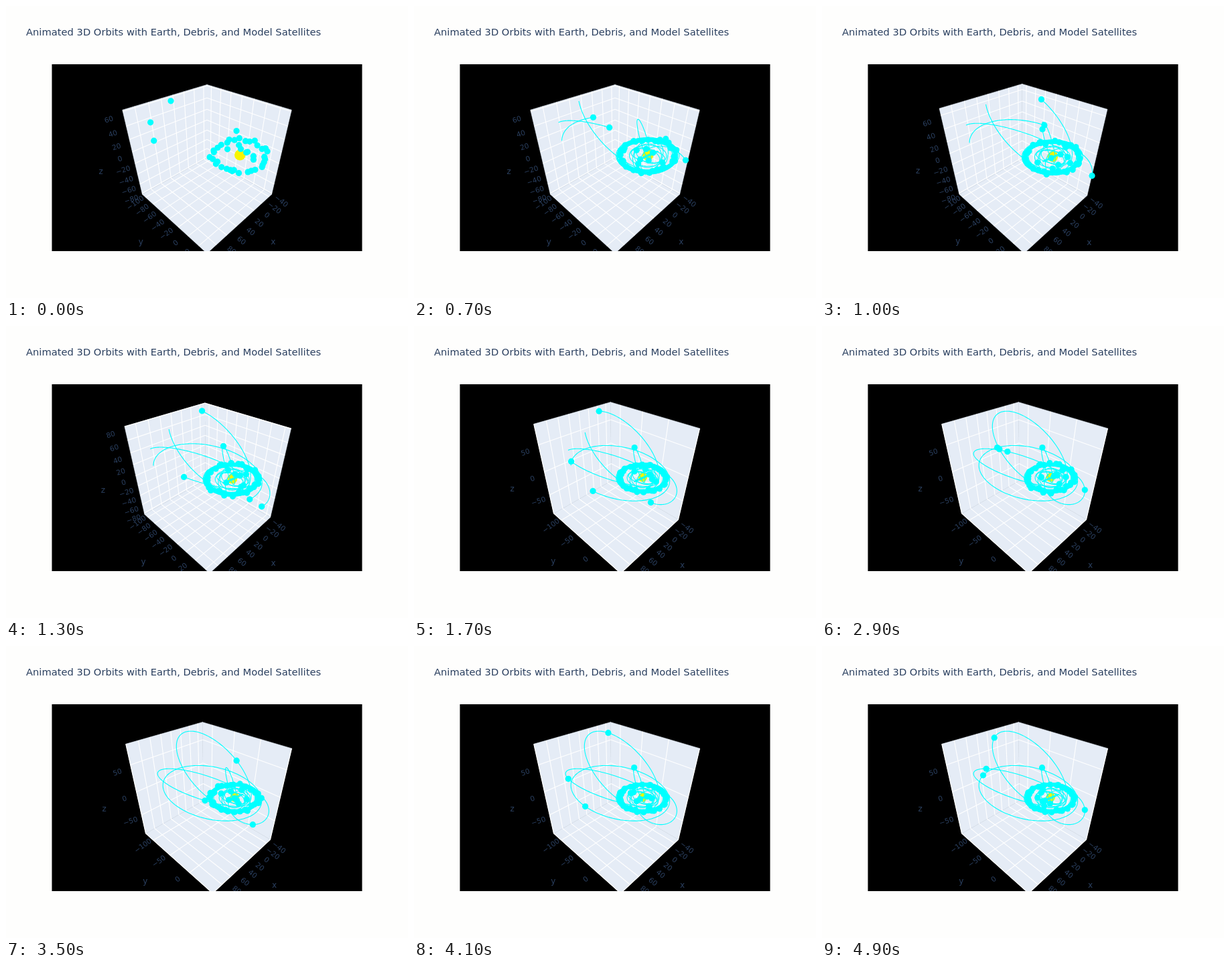
Recreate the animation shown at these times as an HTML page with a canvas. Size 600 by 436 pixels, loop 5 s.

```html
<!DOCTYPE html>
<html lang="en">
<head>
<meta charset="utf-8">
<title>Animated 3D Orbits</title>
<style>
  html, body { margin: 0; width: 100%; height: 100%; overflow: hidden; background: #fefefd; }
  canvas { position: absolute; left: 0; top: 0; width: 600px; height: 436px; }
  h1 {
    position: absolute; left: 30px; top: 28.5px; margin: 0;
    font: 14.7px/20px "DejaVu Sans", Verdana, sans-serif;
    color: #2a3f5f; white-space: nowrap;
  }
</style>
</head>
<body>
<canvas id="stage" width="600" height="436"></canvas>
<h1>Animated 3D Orbits with Earth, Debris, and Model Satellites</h1>
<script>
const ctx = document.getElementById('stage').getContext('2d');
const LOOP = 5000, STEP = 100, TAU = Math.PI * 2, DAY = 800;
const CYAN = '#00ffff', WALL = '#e5ecf6', TEXT = '#2a3f5f';
const FONT = '"DejaVu Sans", Verdana, sans-serif';

// Axis ranges widen as the far orbits climb
const views = [
  { time: 800, zoom: 1.2, lo: [-47.5, -109.5, -82], hi: [96.5, 34.5, 62] },
  { time: 1300, zoom: 1.1, lo: [-52, -110, -83.5], hi: [96, 48, 80.5] },
  { time: 1700, zoom: 1, lo: [-52, -125, -96.4], hi: [100, 50, 83.6] }
];

const lerp = (a, b, f) => a + (b - a) * f;
const mix = (a, b, f) => a.map((v, i) => lerp(v, b[i], f));

function viewAt(t) {
  const i = t < views[1].time ? 0 : 1;
  const a = views[i], b = views[i + 1];
  const f = Math.min(1, Math.max(0, (t - a.time) / (b.time - a.time)));
  const lo = mix(a.lo, b.lo, f), hi = mix(a.hi, b.hi, f);
  const volume = lo.reduce((v, l, n) => v * (hi[n] - l), 1);
  return {
    lo, hi,
    zoom: lerp(a.zoom, b.zoom, f),
    mean: Math.cbrt(volume),
    mid: mix(lo, hi, 0.5),
    steps: i + f > 1.5 ? [20, 50, 50] : [20, 20, 20]
  };
}

// Camera at (1.25, 1.25, 1.25) looking at the centre
function project(view, p) {
  const [x, y, z] = p.map((c, i) => (c - view.mid[i]) / view.mean);
  const depth = 2.165 - (x + y + z) / Math.sqrt(3);
  return [
    300 + 335 * (y - x) / Math.SQRT2 / depth,
    226.6 - 328 * (2 * z - x - y) / Math.sqrt(6) / depth,
    depth
  ];
}

function kepler(m, e) {
  let E = m + e * Math.sin(m);
  for (let i = 0; i < 8; i++) E -= (E - e * Math.sin(E) - m) / (1 - e * Math.cos(E));
  return E;
}

// Long orbit seen on screen: a points to perigee, b along the minor axis,
// g is how much the far end shrinks
function longOrbit(period, perigee, e, a, b, g) {
  return {
    period,
    at(t) {
      const m = (t - perigee) / period * TAU;
      const E = kepler(Math.atan2(Math.sin(m), Math.cos(m)), e);
      const c = Math.cos(E) - e, s = Math.sin(E), d = 1 - g * c;
      return [(a[0] * c + b[0] * s) / d, (a[1] * c + b[1] * s) / d];
    }
  };
}

// Near-circular orbit; size 1 goes round once a day
function nearOrbit(size, drift, start, tilt) {
  const period = DAY * Math.pow(size, 1.5);
  return {
    period,
    at(t) {
      const turn = TAU * t / period, angle = start - turn;
      const r = size + drift * Math.cos(turn);
      return [35 * r * Math.cos(angle), 20 * r * Math.sin(angle) + tilt * Math.sin(turn)];
    }
  };
}

let seed = 7;
function rand(lo, hi) {
  seed = (seed * 16807) % 2147483647;
  return lerp(lo, hi, seed / 2147483647);
}

const repeat = (n, make) => Array.from({ length: n }, (_, i) => make(i));

const orbits = [
  longOrbit(2650, 600, 0.8, [60.9, 80], [41.2, -16.1], 0.26),
  longOrbit(2300, 1000, 0.75, [86, 29], [-10, 18], 0.18),
  longOrbit(2300, 1225, 0.6, [91, 19.3], [-8.2, 42.7], 0.228),
  longOrbit(2000, 150, 0.7, [-18.2, -12.2], [12.9, -15.9], -0.2),
  longOrbit(398, 1101, 0.74, [6.9, 26], [5, 2], 0),
  ...repeat(32, i => nearOrbit(1, rand(-0.13, 0.1), (i + rand(-0.5, 0.5)) / 32 * TAU, rand(-3, 3))),
  ...repeat(7, i => nearOrbit(0.3 + i * 0.06, 0, rand(0, TAU), rand(-10, 10)))
];

function ticks(view, axis) {
  const s = view.steps[axis], out = [];
  for (let v = Math.ceil(view.lo[axis] / s) * s; v <= view.hi[axis]; v += s) out.push(v);
  return out;
}

function path(points) {
  ctx.beginPath();
  points.forEach(p => ctx.lineTo(p[0], p[1]));
}

function drawBox(view) {
  const { lo, hi } = view;
  const at = (axis, v, other, w) => {
    const p = lo.slice();
    p[axis] = v;
    p[other] = w;
    return project(view, p);
  };
  ctx.fillStyle = ctx.strokeStyle = WALL;
  ctx.lineWidth = 0.6;
  for (const [a, b] of [[0, 1], [0, 2], [1, 2]]) {
    path([at(a, lo[a], b, lo[b]), at(a, hi[a], b, lo[b]),
          at(a, hi[a], b, hi[b]), at(a, lo[a], b, hi[b])]);
    ctx.closePath();
    ctx.fill();
    ctx.stroke();
  }
  ctx.strokeStyle = '#fff';
  ctx.lineWidth = 1.1;
  for (let a = 0; a < 3; a++) {
    for (const v of ticks(view, a)) {
      for (let b = 0; b < 3; b++) {
        if (a === b) continue;
        path([at(a, v, b, lo[b]), at(a, v, b, hi[b])]);
        ctx.stroke();
      }
    }
  }
}

function label(text, x, y, deg, size) {
  ctx.save();
  ctx.translate(x, y);
  ctx.rotate(deg * Math.PI / 180);
  ctx.font = size + 'px ' + FONT;
  ctx.fillText(text, 0, 0);
  ctx.restore();
}

// Labels stand off the outer edges: tick offset, title offset, tilt
const edges = [
  { name: 'x', at: (v, { lo, hi }) => [v, hi[1], lo[2]], off: [20, 8], title: [44, 33], deg: 38 },
  { name: 'y', at: (v, { lo, hi }) => [hi[0], v, lo[2]], off: [-17, 10], title: [-44, 33], deg: -36 },
  { name: 'z', at: (v, { lo, hi }) => [hi[0], lo[1], v], off: [-18, 11], title: [-49, 21], deg: -18 }
];

function drawLabels(view) {
  ctx.fillStyle = TEXT;
  ctx.textAlign = 'center';
  ctx.textBaseline = 'middle';
  edges.forEach(({ name, at, off, title, deg }, axis) => {
    for (const v of ticks(view, axis)) {
      const [x, y, d] = project(view, at(v, view));
      const k = 2.15 / d;
      label(String(v).replace('-', '\u2212'), x + off[0] * k, y + off[1] * k, deg, 10.5);
    }
    const [x, y] = project(view, at(view.mid[axis], view));
    label(name, x + title[0], y + title[1], 0, 12);
  });
}

function drawOrbits(view, t) {
  const [cx, cy] = project(view, [0, 0, 0]);
  const k = view.zoom;
  const place = (o, time) => {
    const [x, y] = o.at(time);
    return [cx + x * k, cy + y * k];
  };
  const disc = (x, y, r) => {
    ctx.beginPath();
    ctx.arc(x, y, r, 0, TAU);
    ctx.fill();
  };
  ctx.fillStyle = '#f8f400';
  disc(cx, cy - 1, 6.8 * k);

  ctx.strokeStyle = ctx.fillStyle = CYAN;
  ctx.lineWidth = 1.1;
  for (const o of orbits) {
    const span = Math.min(t, o.period), n = 140;
    if (!span) continue;
    path(repeat(n + 1, i => place(o, span * i / n)));
    ctx.stroke();
  }
  for (const o of orbits) disc(...place(o, t), 4.6);
}

function draw(t) {
  const view = viewAt(t);
  ctx.clearRect(0, 0, 600, 436);
  ctx.save();
  ctx.beginPath();
  ctx.rect(68.5, 87, 463, 279);
  ctx.clip();
  ctx.fillStyle = '#000';
  ctx.fillRect(68, 87, 464, 279);
  drawBox(view);
  drawLabels(view);
  drawOrbits(view, t);
  ctx.restore();
}

const begin = performance.now();
function tick() {
  const t = (performance.now() - begin) % LOOP;
  draw(Math.floor(t / STEP) * STEP);
  requestAnimationFrame(tick);
}
tick();
</script>
</body>
</html>
```
